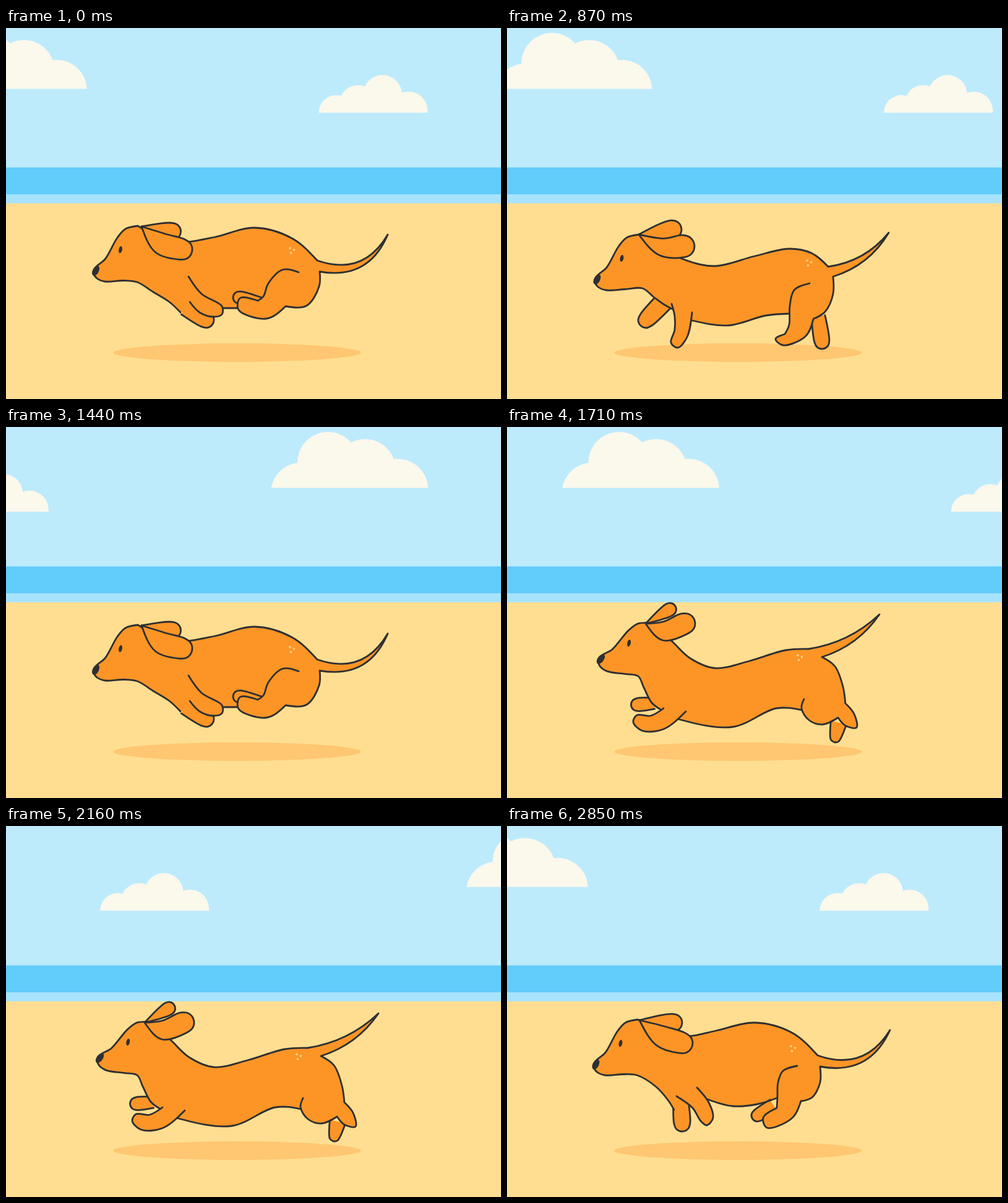
Animation of 800x600 px, one loop 2880 ms. Source, as an HTML page with a canvas:

```html
<!DOCTYPE html>
<html lang="en">
<head>
<meta charset="utf-8">
<title>Running dog</title>
<style>
html, body { margin: 0; width: 100%; height: 100%; overflow: hidden; background: #bdebfc; }
canvas { display: block; }
</style>
</head>
<body>
<canvas id="stage" width="800" height="600"></canvas>
<script>
const ctx = document.getElementById('stage').getContext('2d');
const STEP = 30, STEPS = 96, SPEED = 37.7;
const ORANGE = '#fc9526', INK = '#2e2f32';

// The head keeps its shape; each pose only moves and turns it.
const CHIN = [190, 408.5, 160, 410, 147, 405, 141, 397];
const FACE = [146, 386, 160, 374, 180, 339, 193, 325, 213, 320];

// Key poses. head: dx, dy, turn. tail: tip, lower root, bow.
// ear: root, far tip, near middle, near tip. Far limbs and ears are x, y, radius.
const tuck = {
  head: [0, 0, 0],
  chest: [282, 460, 264, 443, 238, 427, 212, 411],
  back: [265, 346, 294, 346, 338, 338, 402, 323, 462, 340, 503, 376],
  tail: [617, 334, 507, 394, 25],
  haunch: [506, 418, 486, 449, 452, 450],
  belly: [420, 453, 397, 453, 374, 453, 350, 453],
  ear: [219, 321, 269, 329, 13.5, 250, 348, 17, 284, 358, 17],
  farFront: [290, 452, 13, 323, 472, 13],
  farHind: [412, 443, 7, 377, 436, 10],
  nearFront: [295, 402, 316, 430, 349, 450, 349, 463, 335, 467, 313, 460, 297, 443],
  thigh: [473, 395, 447, 391, 424, 413, 416, 434, 407, 441],
  paw: [378, 437, 376, 456, 421, 470, 452, 450],
  spot: [459, 356]
};
const gather = {
  head: [-1.5, -7, 0],
  chest: [270, 459, 260, 443, 240, 421, 210, 403],
  back: [262, 338, 294, 340, 338, 331, 400, 318, 460, 334, 502, 371],
  tail: [619, 330, 506, 389, 25],
  haunch: [506, 415, 493, 439, 475, 445],
  belly: [436, 440, 404, 450, 364, 453, 324, 442],
  ear: [214, 314, 269, 318, 14, 250, 340, 17, 283, 351, 17],
  farFront: [281, 445, 12, 283, 481, 13],
  farHind: [431, 452, 11, 405, 468, 10],
  nearFront: [307, 423, 326, 447, 333, 472, 323, 484, 313, 477, 300, 456, 274, 437],
  thigh: [469, 388, 446, 396, 438, 415, 437, 440, 436, 456],
  paw: [414, 472, 420, 488, 460, 473, 475, 445],
  spot: [459, 356]
};
const land = {
  head: [0.5, 14, 0],
  chest: [268, 455, 252, 446, 237, 435, 219, 421],
  back: [285, 374, 336, 385, 400, 369, 456, 357, 492, 364, 519, 386],
  tail: [617, 331, 527, 402, 11],
  haunch: [527, 430, 514, 459, 496, 470],
  belly: [456, 462, 418, 465, 358, 481, 299, 473],
  ear: [213, 334, 267, 326, 15, 250, 354, 14, 285, 353, 18],
  farFront: [253, 443, 15, 225, 472, 13],
  farHind: [503, 466, 11, 509, 507, 12],
  nearFront: [299, 460, 291, 500, 276, 517, 265, 509, 271, 488, 271, 466, 266, 446],
  thigh: [489, 413, 464, 424, 457, 450, 456, 480, 449, 495],
  paw: [434, 503, 446, 513, 482, 499, 495, 471],
  spot: [485, 376]
};
const reach = {
  head: [12, -10, 0.19],
  chest: [250, 458, 234, 446, 221, 421, 212, 403],
  back: [266, 346, 296, 374, 336, 390, 390, 379, 450, 361, 487, 359],
  tail: [602, 303, 509, 372, 10],
  haunch: [530, 387, 543, 420, 547, 449],
  belly: [477, 458, 435, 455, 365, 485, 275, 472],
  ear: [224, 318, 263, 295, 10.5, 252, 330, 15, 287, 318, 17],
  farFront: [238, 447, 9, 211, 449, 10.5],
  farHind: [536, 478, 13, 531, 501, 9],
  nearFront: [289, 460, 252, 489, 218, 491, 204, 477, 210, 466, 232, 467, 253, 455],
  thigh: [480, 440, 476, 455, 488, 474, 510, 481, 535, 470],
  paw: [547, 483, 565, 486, 561, 464, 548, 448],
  spot: [470, 369]
};

const mix = (a, b) => Object.fromEntries(
  Object.keys(a).map(key => [key, a[key].map((v, i) => (v + b[key][i]) / 2)]));
const shift = (list, size, ...by) => list.map((v, i) => v + (by[i % size] || 0));
const group = (list, size = 2) =>
  Array.from({ length: list.length / size }, (_, i) => list.slice(i * size, (i + 1) * size));

const push = {
  ...land,
  farFront: shift(reach.farFront, 3, 16, -3),
  nearFront: shift(reach.nearFront, 2, 16, -3)
};
const run = [tuck, mix(tuck, push), push, mix(push, reach), reach, mix(reach, land), land, gather];

// Handle at b on the side of c, for a centripetal curve through a, b, c.
function handle(a, b, c) {
  const d1 = Math.hypot(b[0] - a[0], b[1] - a[1]);
  const d2 = Math.hypot(c[0] - b[0], c[1] - b[1]);
  if (!d1 || !d2) return b;
  const r = Math.sqrt(d1 * d2);
  return [0, 1].map(k =>
    (d1 * c[k] - d2 * a[k] + (2 * d1 + 3 * r + d2) * b[k]) / (3 * (d1 + r)));
}

const middle = (a, b) => [(a[0] + b[0]) / 2, (a[1] + b[1]) / 2];

// Adds a smooth curve through all points to the path.
function curve(pts) {
  const end = pts.length - 1;
  for (let i = 0; i < end; i++) {
    const a = pts[i], b = pts[i + 1];
    let out = i ? handle(pts[i - 1], a, b) : null;
    let into = i + 1 < end ? handle(pts[i + 2], b, a) : null;
    out = out || middle(a, into || b);
    into = into || middle(b, out);
    ctx.bezierCurveTo(...out, ...into, ...b);
  }
  return pts[end];
}

// Pieces are smooth; corners lie between them.
function trace(...pieces) {
  let last = pieces[0][0];
  ctx.beginPath();
  ctx.moveTo(...last);
  pieces.forEach((piece, i) => { last = curve(i ? [last, ...piece] : piece); });
  return last;
}

function fill(color) {
  ctx.fillStyle = color;
  ctx.fill();
}

function paint(...pieces) {
  trace(...pieces);
  fill(ORANGE);
  ctx.stroke();
}

// Outline around a spine of x, y, radius with a round tip.
function limb(spine) {
  const left = [], right = [], end = spine.length - 1;
  let angle;
  spine.forEach(([x, y, r], i) => {
    const p = spine[Math.max(0, i - 1)], q = spine[Math.min(end, i + 1)];
    angle = Math.atan2(q[1] - p[1], q[0] - p[0]);
    left.push([x + r * Math.sin(angle), y - r * Math.cos(angle)]);
    right.unshift([x - r * Math.sin(angle), y + r * Math.cos(angle)]);
  });
  const [x, y, r] = spine[end];
  const tip = [-1, 0, 1].map(k => angle + k * Math.PI / 4)
    .map(a => [x + r * Math.cos(a), y + r * Math.sin(a)]);
  paint([...left, ...tip, ...right]);
}

// Bowed tail edge between root and tip.
function tailEdge(root, tip, bow, to) {
  const dx = tip[0] - root[0], dy = tip[1] - root[1];
  const k = 2 * bow / Math.hypot(dx, dy);
  const [x, y] = middle(root, tip);
  ctx.quadraticCurveTo(x - dy * k, y + dx * k, ...to);
}

function bodyPath(pose, place) {
  const points = list => group(list).map(p => place(...p));
  const root = trace([...group(pose.chest), ...points(CHIN)], points(FACE), group(pose.back));
  const [tip, low] = group(pose.tail.slice(0, 4)), bow = pose.tail[4];
  tailEdge(root, tip, bow, tip);
  tailEdge(low, tip, bow, low);
  const belly = group(pose.belly);
  const rear = curve([low, ...group(pose.haunch)]);
  curve([rear, belly[0]]);
  curve(belly);
}

function oval(x, y, rx, ry, turn, color) {
  ctx.beginPath();
  ctx.ellipse(x, y, rx, ry, turn, 0, Math.PI * 2);
  fill(color);
}

function dog(pose) {
  const [dx, dy, turn] = pose.head;
  const cos = Math.cos(turn), sin = Math.sin(turn);
  const place = (x, y) => [
    180 + dx + (x - 180) * cos - (y - 360) * sin,
    360 + dy + (x - 180) * sin + (y - 360) * cos];
  const root = [...pose.ear.slice(0, 2), 0];
  const [farTip, ...near] = group(pose.ear.slice(2), 3);

  ctx.lineWidth = 2.8;
  ctx.lineCap = ctx.lineJoin = 'round';
  ctx.strokeStyle = INK;
  limb([root, farTip]);
  limb(group(pose.farFront, 3));
  bodyPath(pose, place);
  fill(ORANGE);
  limb(group(pose.farHind, 3));
  bodyPath(pose, place);
  ctx.stroke();
  paint(group(pose.thigh), group(pose.paw));
  paint(group(pose.nearFront));
  limb([root, ...near]);

  oval(...place(145, 392.5), 5, 9, 0.45 + turn, INK);
  oval(...place(185, 358.5), 2.8, 5.6, 0.2, INK);
  const [x, y] = pose.spot;
  for (const [sx, sy] of [[0, 0], [6.5, 2.8], [1.5, 7.8]])
    oval(x + sx, y + sy, 1.9, 1.9, 0, '#ffcf80');
}

function band(y, color) {
  ctx.fillStyle = color;
  ctx.fillRect(0, y, 800, 600 - y);
}

// Puffs are x, y, radius, cut off flat at the base.
function cloud(x, base, puffs) {
  ctx.save();
  ctx.beginPath();
  ctx.rect(x - 5, 0, 270, base);
  ctx.clip();
  ctx.beginPath();
  for (const [cx, cy, r] of puffs) {
    ctx.moveTo(x + cx + r, cy);
    ctx.arc(x + cx, cy, r, 0, Math.PI * 2);
  }
  ctx.rect(x + puffs[0][0], base - 20, puffs[3][0] - puffs[0][0], 20);
  fill('#fbf8ec');
  ctx.restore();
}

const big = [[49, 107, 49.5], [92, 57.5, 49.5], [152, 69, 49.5], [204.5, 101, 49.5]];
const small = [[28, 137, 28.5], [63, 123, 30.5], [102.5, 107.5, 31.5], [144.5, 134, 31]];

function scenery(scroll) {
  band(0, '#bdebfc');
  for (const x of [0, 1197, 2361, 3581.5]) {
    cloud(x - 123 - scroll, 98.5, big);
    cloud(x + 506 - scroll, 137, small);
  }
  band(225.5, '#62ccfb');
  band(269, '#a8e3fd');
  band(283.5, '#ffde91');
  oval(373.5, 525, 200, 15, 0, '#ffc772');
}

const start = performance.now();
function frame() {
  const n = Math.floor((performance.now() - start) / STEP) % STEPS;
  scenery(n * SPEED);
  dog(run[(n >> 1) % run.length]);
  requestAnimationFrame(frame);
}
frame();
</script>
</body>
</html>
```
